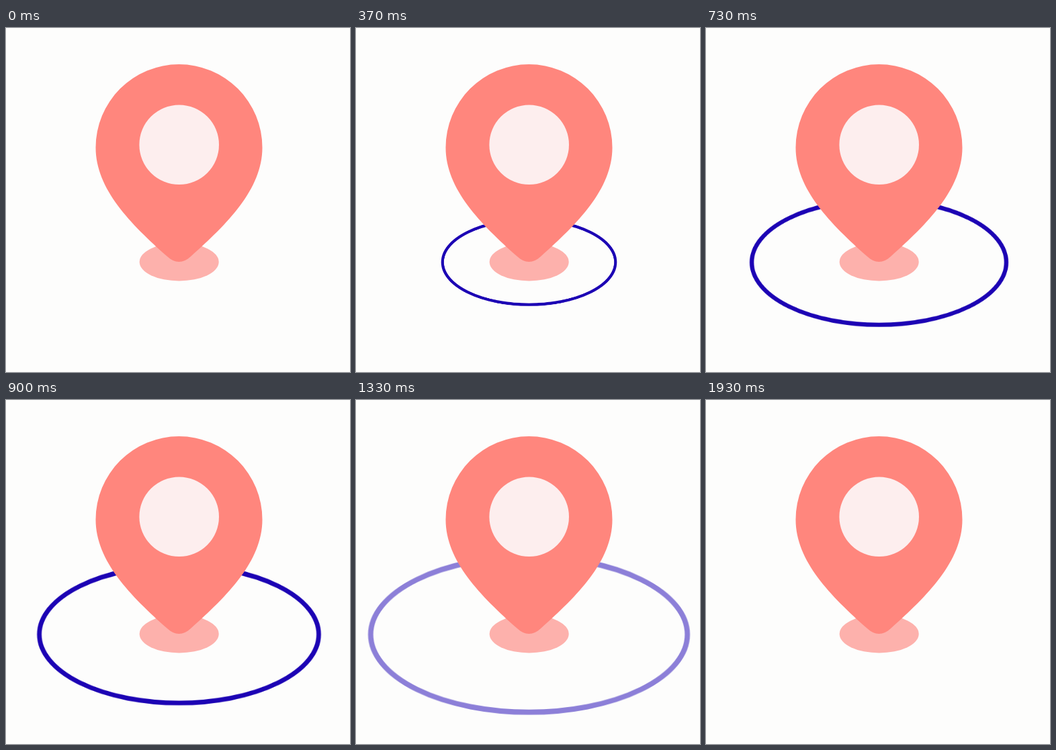
An HTML page that plays this animation: 512x512 px, repeating every 1960 ms.

```html
<!DOCTYPE html>
<html lang="en">
<head>
<meta charset="utf-8">
<title>Location pulse</title>
<style>
  html, body {
    margin: 0;
    width: 100%;
    height: 100%;
    overflow: hidden;
    background: #fdfdfc;
  }

  svg {
    display: block;
    width: 100%;
    height: 100%;
  }

  .ring {
    fill: none;
    stroke: #1c03b4;
    stroke-width: 8;
    transform-origin: 257.5px 348px;
    animation: grow 1960ms infinite, fade 1960ms linear infinite;
  }

  /* Growth and fade both end at 1667 ms, then the pin rests. */
  @keyframes grow {
    0% {
      transform: scale(0);
      animation-timing-function: cubic-bezier(.2, .78, .667, 1);
    }
    85.05%, 100% { transform: scale(1); }
  }

  @keyframes fade {
    0%, 51% { opacity: 1; }
    85.05%, 100% { opacity: 0; }
  }
</style>
</head>
<body>
<svg viewBox="0 0 512 512">
  <ellipse class="ring" cx="257.5" cy="349" rx="242" ry="118.8"/>
  <ellipse cx="257.7" cy="348.2" rx="59" ry="28.3" fill="#fdb1ac"/>
  <path fill="#ff867d" d="M133.5 178
    A124 124 0 0 1 381.5 178
    C381.5 240 329 292 275 340
    C264 350.5 251 350.5 240 340
    C186 292 133.5 240 133.5 178Z"/>
  <circle cx="257.7" cy="173.7" r="59.3" fill="#fdeeee"/>
</svg>
</body>
</html>
```
